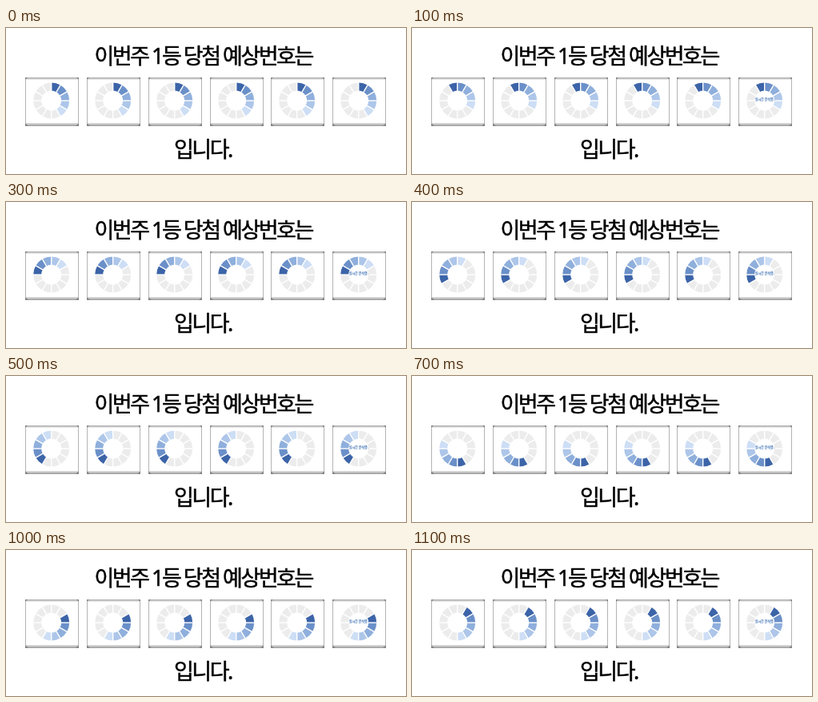
Write an HTML page that moves like this. It is 500 px wide and 183 px high and loops after 1.2 s.

```html
<!DOCTYPE html>
<html lang="ko">
<head>
<meta charset="utf-8">
<style>
html, body { margin: 0; width: 100%; height: 100%; overflow: hidden; background: #fff; }
svg { display: block; width: 500px; height: 183px; }
text { font-family: "Noto Sans", "Noto Sans CJK KR", "Noto Sans CJK", sans-serif; }
.line { font-size: 27px; letter-spacing: -2.5px; stroke: #000; stroke-width: .5px; }
#status { font-size: 4.2px; font-weight: 700; letter-spacing: -.2px; fill: #4778b8; }
</style>
</head>
<body>
<svg viewBox="0 0 500 183">
  <defs>
    <linearGradient id="top" x2="0" y2="1">
      <stop stop-color="#a0a0a0"/>
      <stop offset="1" stop-color="#f4f4f4"/>
    </linearGradient>
    <linearGradient id="bottom" x2="0" y2="1">
      <stop stop-color="#e4e4e4"/>
      <stop offset="1" stop-color="#989898"/>
    </linearGradient>
    <g id="box">
      <path fill="#b4b4b4" d="M0 0H67V61H0Z"/>
      <path fill="#fff" d="M1 0H66V61H1Z"/>
      <path fill="url(#top)" d="M0 0H67V3H0Z"/>
      <path fill="url(#bottom)" d="M0 57H67V61H0Z"/>
      <path fill="#858585" d="M0 0H3L0 3ZM67 0H64L67 3ZM0 61V57L4 61ZM67 61V57L63 61Z"/>
    </g>
    <g id="ring" fill="none" stroke-width="10"></g>
  </defs>
  <text class="line" x="110.5" y="44.8">이번주 1등 당첨 예상번호는</text>
  <g id="row"></g>
  <text id="status" x="428.8" y="91">실시간 분석중..</text>
  <text class="line" x="210" y="162">입니다.</text>
</svg>
<script>
const NS = 'http://www.w3.org/2000/svg';
const COUNT = 12, STEP = 100, RADIUS = 17.5;
const blues = ['#3c64a8', '#6b90c9', '#8fafdc', '#adc6e9', '#cddef5'];
const ring = document.getElementById('ring');
const row = document.getElementById('row');
const statusText = document.getElementById('status');

function add(parent, tag, attrs) {
  const el = document.createElementNS(NS, tag);
  for (const key in attrs) el.setAttribute(key, attrs[key]);
  return parent.appendChild(el);
}

const point = deg => {
  const a = deg * Math.PI / 180;
  return `${RADIUS * Math.sin(a)} ${-RADIUS * Math.cos(a)}`;
};

const segments = Array.from({ length: COUNT }, (_, i) =>
  add(ring, 'path', { d: `M${point(i * 30)}A${RADIUS} ${RADIUS} 0 0 1 ${point(i * 30 + 30)}` }));

// White spokes separate the segments
for (let i = 0; i < COUNT; i++)
  add(ring, 'path', { d: 'M0-12V-24', stroke: '#fff', 'stroke-width': 1.4, transform: `rotate(${i * 30})` });

for (let i = 0; i < 6; i++) {
  const x = Math.round(24.4 + i * 76.75);
  add(row, 'use', { href: '#box', x, y: 62 });
  add(row, 'use', { href: '#ring', x: x + 32.7, y: 91.1 });
}

function draw(time) {
  const step = Math.floor(time / STEP) % COUNT;
  segments.forEach((seg, i) =>
    seg.setAttribute('stroke', blues[(i + step) % COUNT] || '#ececec'));
  statusText.setAttribute('visibility', step ? 'visible' : 'hidden');
}

const start = performance.now();
function tick() {
  draw(performance.now() - start);
  requestAnimationFrame(tick);
}
tick();
</script>
</body>
</html>
```
